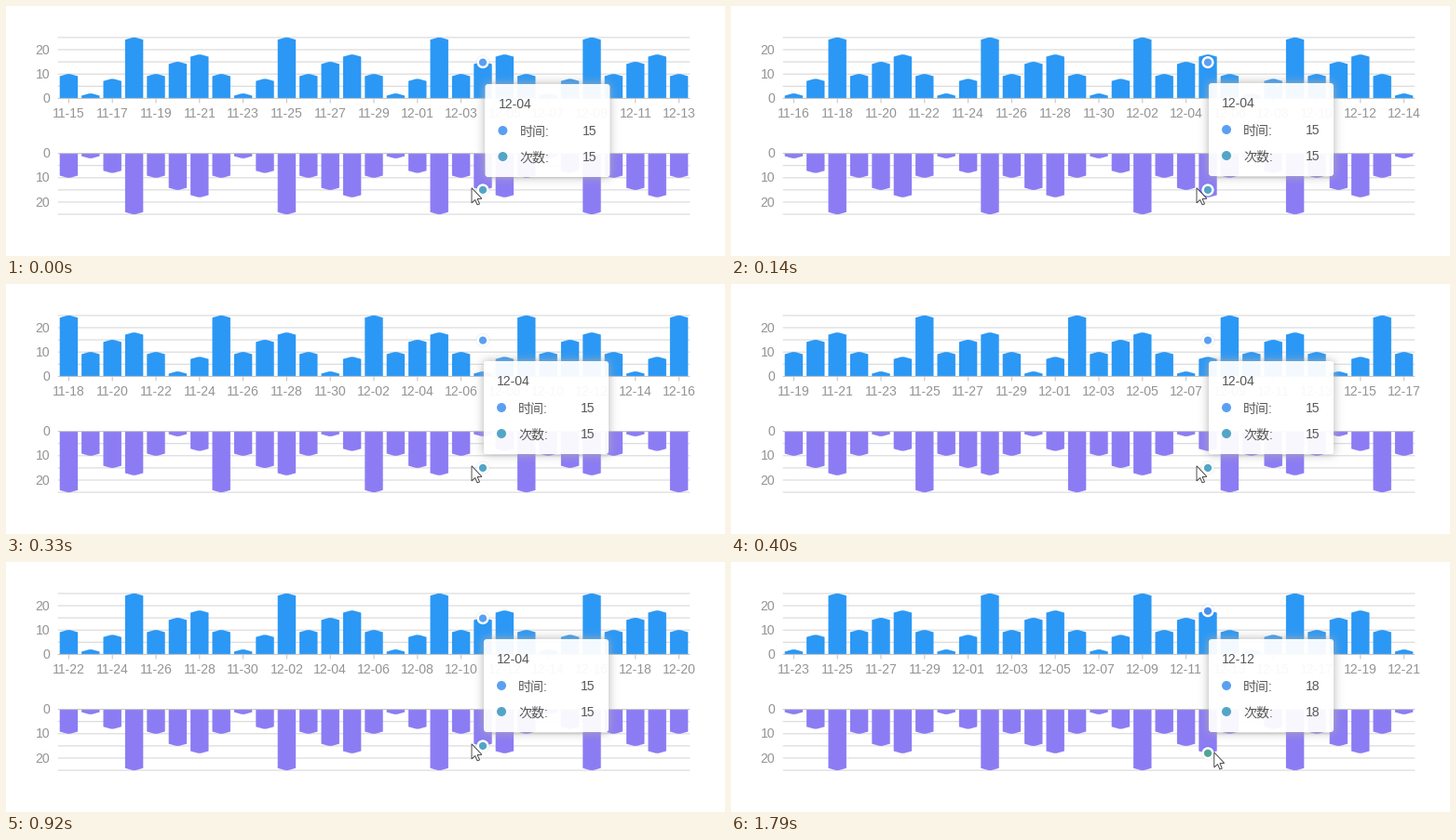
Animation of 772x269 px, one loop 1.85 s. Source, as a matplotlib script:

```python
import math

import matplotlib.pyplot as plt
import numpy as np
from matplotlib.animation import FuncAnimation
from matplotlib.collections import LineCollection, PolyCollection
from matplotlib.patches import Circle, FancyBboxPatch, Polygon
from matplotlib.transforms import Affine2D

W, H, DPI = 772, 269, 64
PX = 72 / DPI                      # points per pixel
LOOP, STEP = 1850, 10

LEFT, RIGHT, COUNT = 55.7, 734.3, 29
BAND = (RIGHT - LEFT) / COUNT
BAR_W = 19.4
UNIT = 2.62                        # pixels per value
TOP_ZERO, LOW_ZERO = 99.4, 158.6
WEEK = [10, 2, 8, 25, 10, 15, 18]
HOVER = 19                         # index of the hovered column

# (time in ms, first visible day counted from 11-15)
PANS = [(0, 0), (140, 1), (270, 2), (330, 3), (400, 4),
        (800, 6), (920, 7), (1060, 8)]
HOVER_TIME = 1790

BLUE, PURPLE = "#2b98f5", "#8c7cf4"
GRID, AXIS, LABEL, INK = "#d4d4d4", "#bfc2c6", "#949494", "#575757"
DOT_BLUE, DOT_TEAL = "#5b9ff2", "#52a5c6"

plt.rcParams["font.family"] = ["Liberation Sans", "Noto Sans CJK JP"]
plt.rcParams["toolbar"] = "None"

fig = plt.figure(figsize=(W / DPI, H / DPI), dpi=DPI, facecolor="white")
ax = fig.add_axes([0, 0, 1, 1])
ax.axis("off")
ax.set_xlim(0, W)
ax.set_ylim(H, 0)


def center(i):
    return LEFT + (i + 0.5) * BAND


def date(day):
    n = 15 + day
    return f"11-{n:02d}" if n <= 30 else f"12-{n - 30:02d}"


def text(x, y, s, color=LABEL, ha="center", **kw):
    return ax.text(x, y + 5, s, color=color, ha=ha, va="baseline",
                   fontsize=14 * PX, **kw)


def bar(i, value, zero, sign):
    """Column with a low pointed end; sign is -1 for up, 1 for down."""
    x, end = center(i), zero + sign * value * UNIT
    shoulder = end - sign * 2.3
    l, r = x - BAR_W / 2, x + BAR_W / 2
    return [(l, zero), (l, shoulder), (x - 1.5, end), (x + 1.5, end),
            (r, shoulder), (r, zero)]


def marker(color):
    layers = [Circle((0, 0), r, fc=fc, alpha=a, lw=0, zorder=6)
              for r, fc, a in ((8, "black", 0.025), (7.2, "black", 0.03),
                               (6.6, "white", 1), (4.1, color, 1))]
    for c in layers:
        ax.add_patch(c)
    return layers


def place(layers, y, color):
    for c in layers:
        c.center = (center(HOVER), y)
    layers[-1].set_facecolor(color)


def lines(segments, color, z):
    """Hairlines kept at their fractional place, as on a canvas."""
    ax.add_collection(LineCollection(segments, colors=color, linewidths=PX,
                                     snap=False, capstyle="butt", zorder=z),
                      autolim=False)


# grid, axes and value labels
for zero, sign in ((TOP_ZERO, -1), (LOW_ZERO, 1)):
    rows = [zero + sign * v * UNIT for v in range(0, 26, 5)]
    lines([[(LEFT, y), (RIGHT, y)] for y in rows[1:]], GRID, 1)
    lines([[(LEFT, rows[0]), (RIGHT, rows[0])]], AXIS, 3)
    for v in (0, 10, 20):
        text(47, zero + sign * v * UNIT - 0.4, str(v), ha="right")

lines([[(center(i), TOP_ZERO), (center(i), TOP_ZERO + 5)]
       for i in range(0, COUNT, 2)], AXIS, 3)

bars_up = PolyCollection([], facecolors=BLUE, linewidths=0, zorder=2)
bars_down = PolyCollection([], facecolors=PURPLE, linewidths=0, zorder=2)
for bars in (bars_up, bars_down):
    ax.add_collection(bars, autolim=False)
day_labels = [text(center(i), 115, "", zorder=3) for i in range(0, COUNT, 2)]

mark_up, mark_down = marker(DOT_BLUE), marker(DOT_TEAL)

# tooltip
BX, BY, BW, BH, PAD, RADIUS = 513, 83, 134, 100, 18, 3
shift = Affine2D()
moving = shift + ax.transData


def blurred(pos, size, sigma=5):
    s = sigma * math.sqrt(2)
    return np.array([(math.erf(p / s) - math.erf((p - size) / s)) / 2
                     for p in pos])


def shadow_image():
    px = np.arange(-PAD, BW + PAD) + 0.5
    py = np.arange(-PAD, BH + PAD) + 0.5
    img = np.full((len(py), len(px), 4), 174 / 255)
    img[..., 3] = 0.95 * np.outer(blurred(py, BH), blurred(px, BW))
    dx = np.maximum(abs(px - BW / 2) - BW / 2 + RADIUS, 0)
    dy = np.maximum(abs(py - BH / 2) - BH / 2 + RADIUS, 0)
    img[np.hypot(dx[None, :], dy[:, None]) < RADIUS, 3] = 0
    return img


shadow = ax.imshow(shadow_image(), interpolation="nearest", aspect="auto",
                   extent=(0, 1, 1, 0), zorder=7)

ax.add_patch(FancyBboxPatch((BX, BY), BW, BH, fc="white", alpha=0.95, lw=0,
                            boxstyle=f"round,pad=0,rounding_size={RADIUS}",
                            transform=moving, zorder=8))
tip = dict(color=INK, transform=moving, zorder=9)
title = text(527, 104, "", ha="left", **tip)
values = []
for y, name, color in ((133, "时间:", DOT_BLUE), (161, "次数:", DOT_TEAL)):
    ax.add_patch(Circle((532, y), 5, fc=color, lw=0,
                        transform=moving, zorder=9))
    text(550, y + 0.6, name, ha="left", **tip)
    values.append(text(632.8, y, "", ha="right", **tip))

# mouse pointer
ARROW = np.array([(0, 0), (0, 16.2), (3.7, 12.8), (6.1, 18.2),
                  (8.5, 17.2), (6.1, 11.8), (10.9, 11.6)])
pointer = Polygon(ARROW, closed=True, fc="white", ec="#333333", lw=0.85 * PX,
                  joinstyle="miter", zorder=10)
ax.add_patch(pointer)


def update(frame):
    t = frame * STEP
    start = [day for when, day in PANS if when <= t][-1]
    data = [WEEK[(start + i) % 7] for i in range(COUNT)]
    bars_up.set_verts([bar(i, v, TOP_ZERO, -1) for i, v in enumerate(data)])
    bars_down.set_verts([bar(i, v, LOW_ZERO, 1) for i, v in enumerate(data)])
    for k, label in enumerate(day_labels):
        label.set_text(date(start + 2 * k))

    # the tooltip settles right after the loop begins
    dx, dy = (1.4, 1) if t < 70 else (0, 0)
    shift.clear().translate(dx, dy)
    shadow.set_extent((BX - PAD + round(dx), BX + BW + PAD + round(dx),
                       BY + BH + PAD + dy, BY - PAD + dy))
    ax.set_xlim(0, W)
    ax.set_ylim(H, 0)

    late = t >= HOVER_TIME
    value = 18 if late else 15
    title.set_text("12-12" if late else "12-04")
    for v in values:
        v.set_text(str(value))
    place(mark_up, TOP_ZERO + 0.5 - value * UNIT,
          "#4c90ee" if late else DOT_BLUE)
    place(mark_down, LOW_ZERO + value * UNIT,
          "#4fa696" if late else DOT_TEAL)
    pointer.set_xy(ARROW + ((518.8, 204.8) if late else (500, 195.7)))
    return []


anim = FuncAnimation(fig, update, frames=LOOP // STEP, interval=STEP,
                     init_func=lambda: update(0), repeat=True,
                     repeat_delay=0, blit=False)
plt.show()
```
